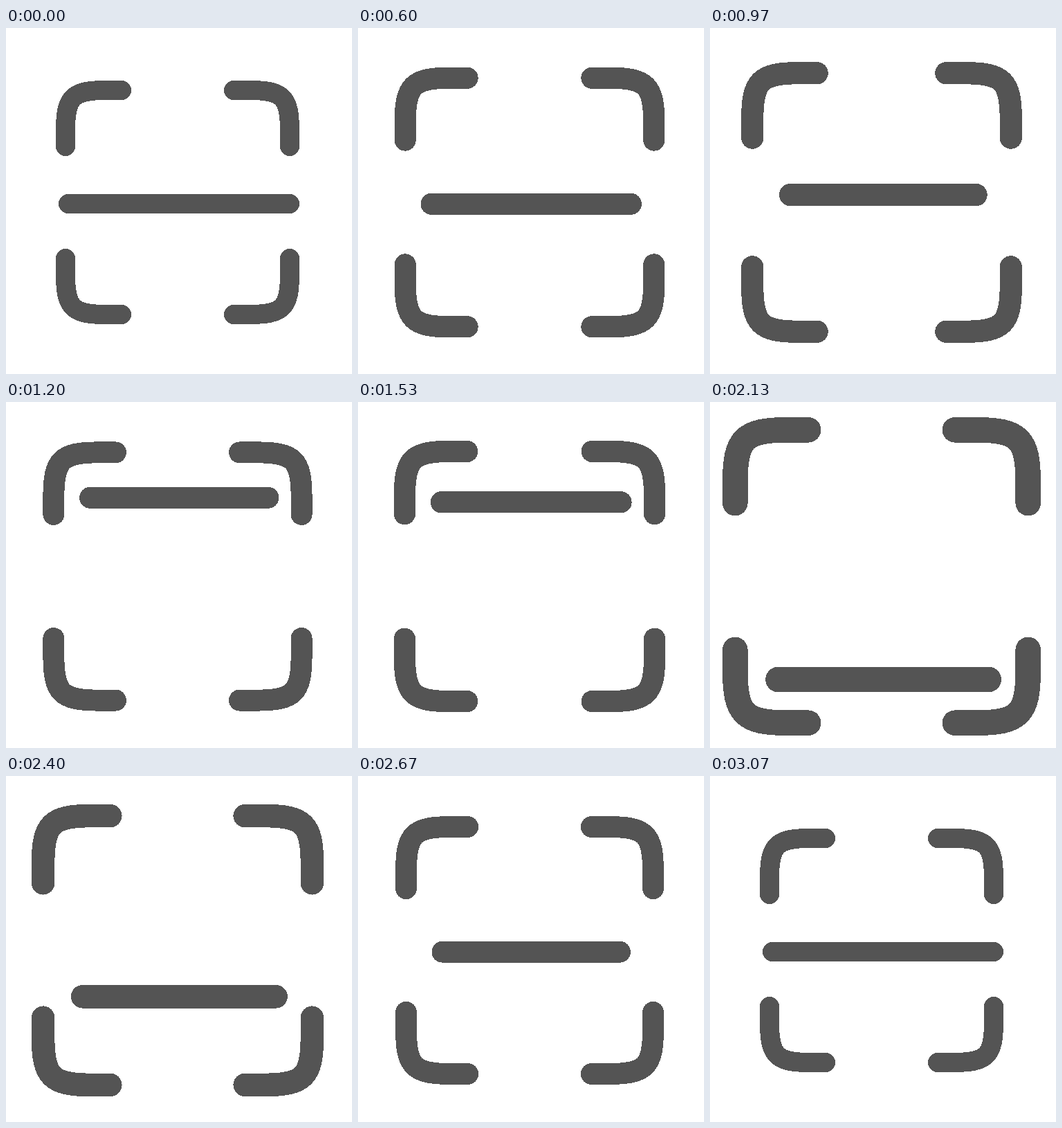
An HTML page that plays this animation: 500 by 500 pixels, repeating every 3.23 s.

```html
<!DOCTYPE html>
<html lang="en">
<head>
<meta charset="utf-8">
<title>Scan</title>
<style>
  html, body { margin: 0; width: 100%; height: 100%; overflow: hidden; background: #fff; }
  svg { display: block; width: 100vw; height: 100vh; }
</style>
</head>
<body>
<svg viewBox="0 0 500 500" shape-rendering="crispEdges">
  <g id="icon" fill="none" stroke="#545454" stroke-width="28" stroke-linecap="round">
    <path id="corners"/>
    <path id="bar"/>
  </g>
</svg>
<script>
const LOOP = 3230;
const FPS = 30;
const icon = document.getElementById('icon');
const corners = document.getElementById('corners');
const bar = document.getElementById('bar');

// Each key: frame, icon scale, half length of the bar, height of the bar.
const keys = [
  { at: 10,   scale: 1,     half: 160,   y: 2 },
  { at: 24.2, scale: 1.159, half: 116.4, y: 2 },
  { at: 40,   scale: 1.102, half: 116.4, y: -110 },
  { at: 64,   scale: 1.307, half: 116.4, y: 114 },
  { at: 79.8, scale: 1.102, half: 116.4, y: 2 },
  { at: 92.2, scale: 1,     half: 160,   y: 2 }
];

function cornerPath(sx, sy) {
  const edge = 162, arm = 81, bend = 58, pull = 0.83;
  const start = edge - bend, handle = start + bend * pull;
  const p = (x, y) => `${x * sx} ${y * sy}`;
  return `M${p(arm, edge)}L${p(start, edge)}` +
    `C${p(handle, edge)} ${p(edge, handle)} ${p(edge, start)}L${p(edge, arm)}`;
}

// Cubic bezier (0.7, 0, 0.3, 1), solved by bisection.
function ease(x) {
  let lo = 0, hi = 1, u = x;
  for (let i = 0; i < 24; i++) {
    u = (lo + hi) / 2;
    const v = 1 - u;
    const bx = 2.1 * v * v * u + 0.9 * v * u * u + u * u * u;
    if (bx < x) lo = u; else hi = u;
  }
  return u * u * (3 - 2 * u);
}

function poseAt(frame) {
  const last = keys[keys.length - 1];
  if (frame <= keys[0].at) return keys[0];
  if (frame >= last.at) return last;
  const i = keys.findIndex(k => k.at > frame);
  const a = keys[i - 1], b = keys[i];
  const k = ease((frame - a.at) / (b.at - a.at));
  const mix = name => a[name] + (b[name] - a[name]) * k;
  return { scale: mix('scale'), half: mix('half'), y: mix('y') };
}

function draw(ms) {
  const frame = Math.floor((ms % LOOP + 3.5) * FPS / 1000);
  const { scale, half, y } = poseAt(frame);
  icon.setAttribute('transform', `translate(248 252) scale(${scale})`);
  bar.setAttribute('d', `M${2 - half} ${y}H${2 + half}`);
}

corners.setAttribute('d',
  cornerPath(-1, -1) + cornerPath(1, -1) + cornerPath(1, 1) + cornerPath(-1, 1));

const begin = performance.now();
function tick() {
  draw(performance.now() - begin);
  requestAnimationFrame(tick);
}
tick();
</script>
</body>
</html>
```
